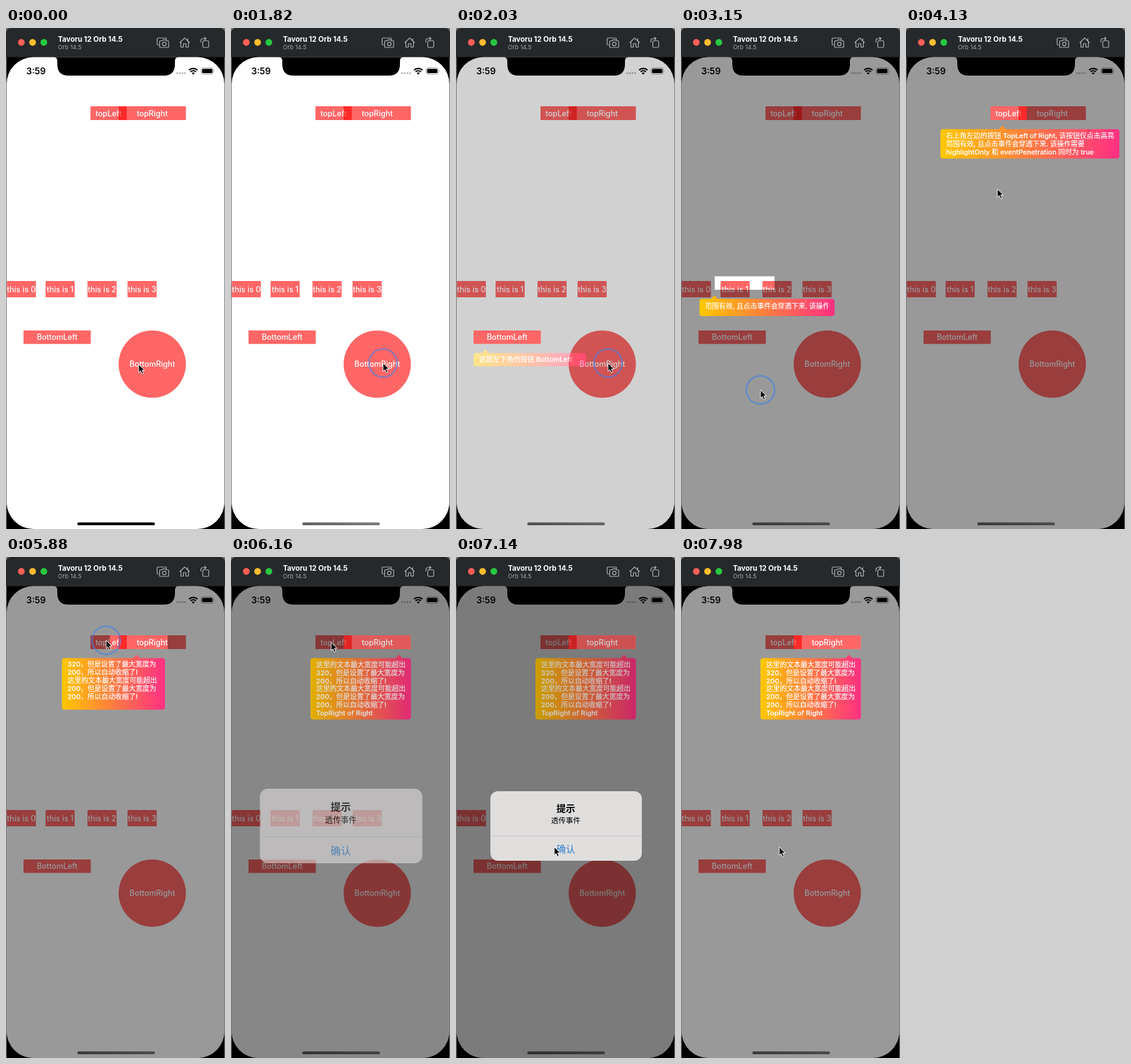
An HTML page that plays this animation: 350x800 px, repeating every 8 s.

```html
<!DOCTYPE html>
<html lang="zh-CN">
<head>
<meta charset="utf-8">
<title>Guide overlay</title>
<style>
html, body { margin: 0; width: 100%; height: 100%; overflow: hidden; background: #777; }
svg { display: block; width: 350px; height: 800px; }
text { font-family: Inter, "Noto Sans CJK SC", "Noto Sans CJK", sans-serif; white-space: pre; }
.label { font-size: 12.4px; font-weight: 500; fill: #fff; text-anchor: middle; }
.tip { font-size: 11px; font-weight: 500; fill: #fff; stroke: #fff; stroke-width: .2; }
.icon { fill: none; stroke: #b2b5b7; stroke-width: 1.2; stroke-linejoin: round; }
.mid { text-anchor: middle; }
</style>
</head>
<body>
<svg viewBox="0 0 350 800">
  <defs>
    <clipPath id="screen"><rect x="1" y="46.5" width="348" height="753.5" rx="43"/></clipPath>
    <clipPath id="labelClip"><rect id="labelBox"/></clipPath>
    <linearGradient id="warm">
      <stop offset="0" stop-color="#ffc800"/><stop offset="1" stop-color="#ff2f83"/>
    </linearGradient>
    <linearGradient id="barGray">
      <stop offset="0" stop-color="#606060"/><stop offset="1" stop-color="#7c7c7c"/>
    </linearGradient>
  </defs>

  <rect y="46" width="350" height="754"/>
  <path d="M.5 46V800M349.5 46V800" stroke="#777"/>
  <path d="M0 46.500V8a8 8 0 0 1 8-8H342a8 8 0 0 1 8 8V46.500Z" fill="#25292b"/>
  <g id="lights"></g>
  <text x="83" y="21.5" font-size="11.5" font-weight="700" fill="#fff">Tavoru 12 Orb 14.5</text>
  <text x="83" y="34" font-size="9.6" fill="#a0a3a4">Orb 14.5</text>
  <g class="icon">
    <path d="M244.500 27h-1.500q-1.500 0-1.500-1.500v-8q0-1.500 1.500-1.500H255q1.500 0 1.500 1.500V19"/>
    <path d="M246.500 20.500h3l1.500-1.700h4l1.500 1.700h2.500q1 0 1 1v8.500q0 1-1 1h-12.500q-1 0-1-1v-8.500q0-1 1-1Z"/>
    <circle cx="253" cy="25.500" r="2.900"/>
    <path d="M277.500 23.500L285.500 16l8 7.500M279.500 22V30.500H283.500V25H287.500V30.500H291.500V22M290.500 20v-3.500"/>
    <rect x="314.500" y="20.500" width="9.500" height="10.500" rx="1.500"/>
    <path d="M311.500 23v-3q0-3 3-3h5M317 14.500l2.800 2.500-2.800 2.500"/>
  </g>

  <g clip-path="url(#screen)">
    <rect y="46" width="350" height="754" fill="#fff"/>
    <text x="32.500" y="74" font-size="14" font-weight="600">3:59</text>
    <path d="M273.500 72H287" stroke="#b5b5b5" stroke-width="3" stroke-linecap="round" stroke-dasharray="0 4.200"/>
    <path d="M292.500 67.300a9.800 9.800 0 0 1 13.600 0M295 70a6.200 6.200 0 0 1 8.600 0" fill="none" stroke="#000" stroke-width="2.200"/>
    <path d="M296.900 71.900q2.400-2 4.800 0L299.300 74.400Z"/>
    <rect x="311.800" y="63.800" width="19.600" height="9.800" rx="2.800" fill="none" stroke="#888" stroke-width=".9"/>
    <rect x="313.300" y="65.300" width="16.600" height="6.800" rx="1.600"/>
    <path d="M332.800 67v3.400q1.300-1.700 0-3.400Z" fill="#888"/>
    <g id="labels"></g>
    <rect id="homeBar" x="114" y="789.600" width="124" height="4.400" rx="2.200"/>
    <g id="guide">
      <path id="dim" fill-rule="evenodd" fill-opacity=".4"/>
      <path id="bubble" fill="url(#warm)"/>
      <g clip-path="url(#labelClip)" id="tip"></g>
    </g>
    <rect id="alertDim" y="46" width="350" height="754" fill-opacity=".2"/>
    <path d="M75 46q7 0 7 7v5q0 18 18 18H252q18 0 18-18v-5q0-7 7-7Z"/>
    <g id="alert">
      <rect x="55" y="374" width="242" height="111" rx="12" fill="#e0dedd"/>
      <path d="M55 445.500H297" stroke="#c6c4c4"/>
      <text class="mid" x="175.500" y="406.500" font-size="15" font-weight="700">提示</text>
      <text class="mid" x="175.500" y="424.500" font-size="11.700">透传事件</text>
      <text class="mid" x="175.500" y="471.500" font-size="15" fill="#2b7fd4">确认</text>
    </g>
  </g>

  <circle id="ring" r="22.500" fill="none" stroke="#4382e6" stroke-opacity=".62" stroke-width="2.500"/>
  <path id="cursor" d="M0 0V13.300L3 10.500 5.200 15.500 7.500 14.500 5.400 9.600H9.500Z" stroke="#fff"/>
</svg>
<script>
const LOOP = 8000, LINE = 12.8, PAD = 9, MARGIN = 9;
const $ = id => document.getElementById(id);
const lerp = (a, b, p) => a + (b - a) * p;

// Smooth progress from 0 to 1, starting at a given time.
function ease(t, from, duration = 300) {
  const p = Math.min(1, Math.max(0, (t - from) / duration));
  return p * p * (3 - 2 * p);
}

function set(id, attrs) {
  for (const name in attrs) $(id).setAttribute(name, attrs[name]);
}

const box = (name, x, y, w, h) => ({ name, x, y, w, h });
const topLeft = box("topLeft", 135, 125, 58, 22);
const topRight = box("topRight", 180, 125, 107.5, 22);
const bottomLeft = box("BottomLeft", 28, 483, 107.5, 21.5);
const bottomRight = box("BottomRight", 180, 483, 107.5, 107.5);
const cells = [24.5, 86.5, 153.5, 217.5].map((cx, i) => box("this is " + i, cx - 23.2, 404, 46.4, 26));

$("lights").innerHTML = ["#ff5f57", "#febc2e", "#28c840"].map((color, i) =>
  `<circle cx="${24.5 + 18 * i}" cy="23" r="5.4" fill="${color}"/>`).join("");
$("labels").innerHTML = [topLeft, topRight, ...cells, bottomLeft, bottomRight].map(({ name, x, y, w, h }) =>
  `<rect x="${x}" y="${y}" width="${w}" height="${h}" rx="${h > w / 2 && h > 50 ? h / 2 : 0}" fill="red" fill-opacity=".6"/>` +
  `<text class="label" x="${x + w / 2}" y="${y + h / 2 + 4.5}">${name}</text>`).join("");

const wide = "这里的文本最大宽度可能超出", limit = "但是设置了最大宽度为", shrink = "200，所以自动收缩了!";
const steps = [
  { start: 1890, hole: bottomLeft, width: 180, lines: ["这是左下角的按钮 BottomLeft"] },
  { start: 3055, hole: topLeft, width: 286, lines: ["右上角左边的按钮 TopLeft of Right, 该按钮仅点击高亮",
    "范围有效, 且点击事件会穿透下来. 该操作需要", "highlightOnly 和 eventPenetration 同时为 true"] },
  { start: 5692, hole: topRight, width: 160.5, alignEnd: true, lines: [wide, "320，" + limit, shrink,
    wide, "200，" + limit, shrink, "TopRight of Right"] }
];

// Bubbles hang below the highlighted box, aligned to one of its sides.
for (const s of steps) {
  const { x, y, w, h } = s.hole, end = x + w;
  s.x = s.alignEnd ? end - s.width : Math.min(x, 350 - MARGIN - s.width);
  s.y = y + h + 14.5;
  s.arrow = s.alignEnd ? end - 19 : x + 19;
  s.textHeight = s.lines.length * LINE;
}

const ALERT_IN = 6020, ALERT_OUT = 7630;
const presses = [...steps.map(s => s.start), ALERT_OUT];
const moves = [[500, 212, 537], [500, 243, 535], [2100, 127, 578], [3400, 146, 257], [4400, 160, 133], [6120, 157, 463]];

function cursorAt(t) {
  return moves.reduce(([x, y], [start, nx, ny]) => {
    const p = ease(t, start, 700);
    return [lerp(x, nx, p), lerp(y, ny, p)];
  }, moves[0].slice(1));
}

let shownLines;
function showTip(lines) {
  if (lines === shownLines) return;
  shownLines = lines;
  $("tip").innerHTML = lines.map(s => `<text class="tip">${s}</text>`).join("");
}

function drawGuide(t) {
  const index = Math.max(0, steps.findLastIndex(s => s.start <= t));
  const to = steps[index], from = steps[Math.max(0, index - 1)];
  const p = ease(t, to.start), late = p * p, early = Math.min(1, p * 1.4);
  const mix = (key, q) => lerp(from[key], to[key], q);
  const [hx, hy, hw, hh] = ["x", "y", "w", "h"].map(k => lerp(from.hole[k], to.hole[k], p));

  // The frame resizes ahead of its sideways move and its text.
  const x = mix("x", late), y = mix("y", p), arrow = mix("arrow", late);
  const w = mix("width", early), h = mix("textHeight", p) + 8.5, textHeight = mix("textHeight", late);
  set("guide", { opacity: ease(t, steps[0].start) });
  set("dim", { d: `M0 46H350V800H0ZM${hx} ${hy}h${hw}v${hh}h${-hw}Z` });
  set("bubble", { d: `M${x + 4.5} ${y}H${arrow - 5.5}l5.5-5.5 5.5 5.5H${x + w - 4.5}q4.5 0 4.5 4.5v${h - 9}q0 4.5-4.5 4.5H${x + 4.5}q-4.5 0-4.5-4.5v${9 - h}q0-4.5 4.5-4.5Z` });
  set("labelBox", { x: x + PAD, y: y + 4, width: mix("width", p) - PAD, height: textHeight });

  showTip(to.lines);
  [...$("tip").children].forEach((line, i) => {
    line.setAttribute("x", x + PAD);
    line.setAttribute("y", y + 8 + (textHeight - to.textHeight) / 2 + (i + .5) * LINE);
  });
}

function render(t) {
  drawGuide(t);

  const shown = ease(t, ALERT_IN, 250) - ease(t, ALERT_OUT, 280);
  const scale = lerp(1.18, 1, ease(t, ALERT_IN, 250));
  set("alertDim", { opacity: shown });
  set("alert", { opacity: shown, transform: `translate(176 429.5) scale(${scale}) translate(-176 -429.5)` });
  set("homeBar", { fill: t < 1750 ? "#000" : "url(#barGray)" });

  const [cx, cy] = cursorAt(t);
  const pressed = presses.some(time => t >= time - 140 && t < time + 210);
  set("cursor", { transform: `translate(${cx} ${cy})` });
  set("ring", { cx, cy, visibility: pressed ? "visible" : "hidden" });
}

const start = performance.now();
function tick() {
  render((performance.now() - start) % LOOP);
  requestAnimationFrame(tick);
}
tick();
</script>
</body>
</html>
```
